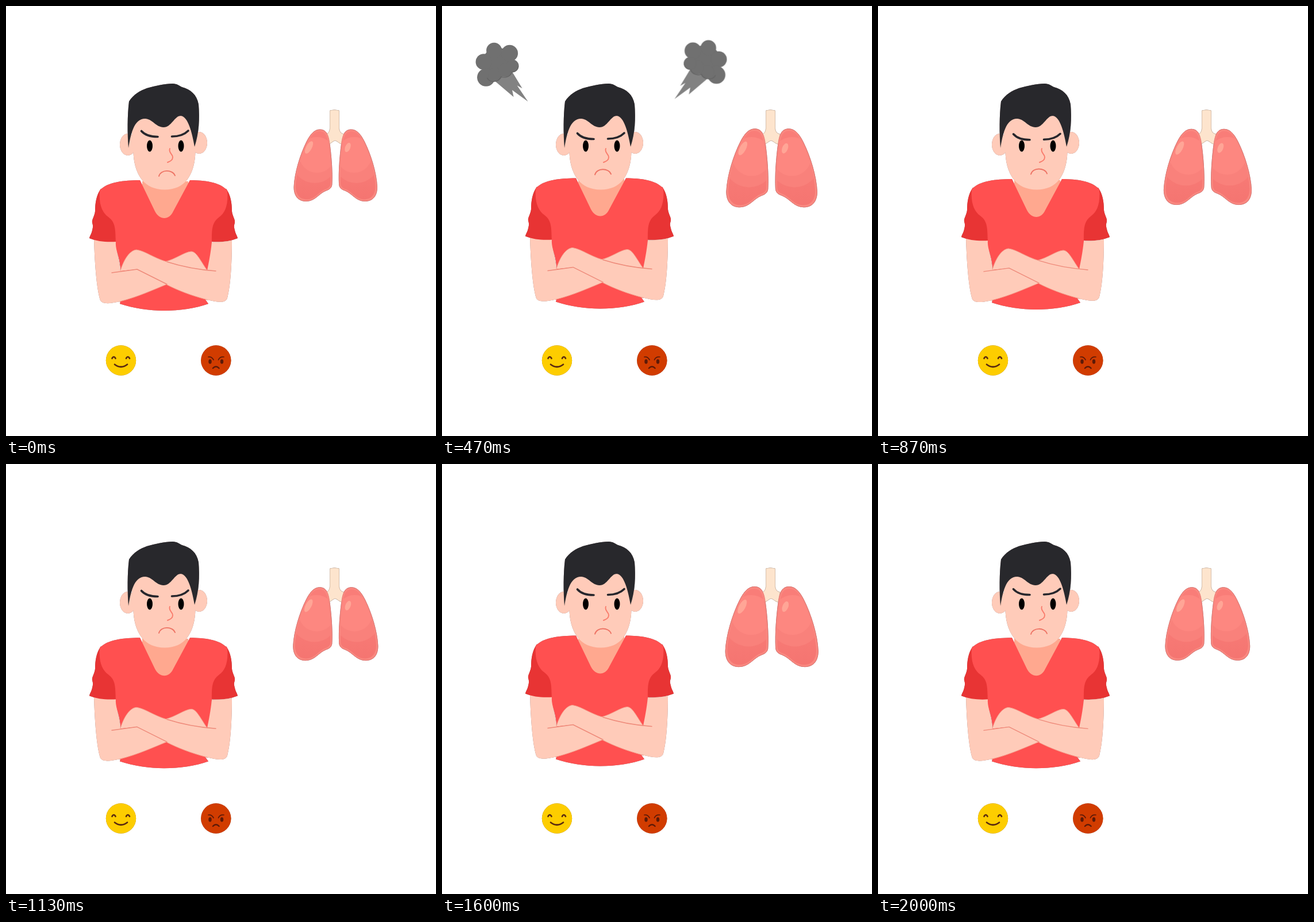
These frames come from a looping animation (748x748 px, 2.07 s). An HTML page without scripts:

```html
<!DOCTYPE html>
<html lang="en">
<head>
<meta charset="utf-8">
<title>Anger and breathing</title>
<style>
@property --breath { syntax: '<number>'; inherits: true; initial-value: 0; }
@property --puff { syntax: '<number>'; inherits: true; initial-value: 0; }
@property --brow { syntax: '<number>'; inherits: true; initial-value: 0; }

html, body { margin: 0; width: 100%; height: 100%; overflow: hidden; background: #fff; }
svg {
  display: block; width: 100vw; height: 100vh;
  animation: breath 2070ms -8ms infinite, puff 2070ms -8ms infinite, brow 2070ms -8ms infinite;
}

/* The picture advances in 31 equal ticks per loop. */
@keyframes breath {
  0% { --breath: 0; animation-timing-function: steps(4); }
  12.903% { --breath: .46; animation-timing-function: steps(5); }
  29.032% { --breath: 1; animation-timing-function: steps(4); }
  41.935% { --breath: .46; animation-timing-function: steps(3); }
  51.613% { --breath: .03; animation-timing-function: steps(5); }
  67.742% { --breath: .69; animation-timing-function: steps(3); }
  77.419% { --breath: 1; animation-timing-function: steps(3); }
  87.097% { --breath: .53; animation-timing-function: steps(3); }
  96.774% { --breath: .14; animation-timing-function: steps(1); }
  100% { --breath: 0; }
}
@keyframes puff {
  0%, 3.226% { --puff: -.6; animation-timing-function: steps(9); }
  32.258%, 100% { --puff: 1.2; }
}
@keyframes brow {
  0% { --brow: 0; animation-timing-function: steps(4); }
  12.903% { --brow: 2.4; animation-timing-function: steps(5); }
  29.032% { --brow: 5; animation-timing-function: steps(2); }
  35.484% { --brow: 5.8; animation-timing-function: steps(2); }
  41.935% { --brow: 5.3; animation-timing-function: steps(8); }
  67.742% { --brow: .7; animation-timing-function: steps(10); }
  100% { --brow: 0; }
}
@keyframes show {
  0% { visibility: hidden; }
  3.226% { visibility: visible; }
  35.484%, 100% { visibility: hidden; }
}
@keyframes blink {
  0% { transform: none; }
  9.677% { transform: scaleY(.67); }
  12.903% { transform: scaleY(.35); }
  16.129% { transform: scaleY(.67); }
  19.355%, 100% { transform: none; }
}

.edged { filter: drop-shadow(0 0 .5px #3008); }
.torso { transform: translateY(calc(var(--breath) * -4.5px)); }
.lung { transform: scale(calc(1 + var(--breath) * .118)); }
.lung.a { transform-origin: 567.5px 228px; }
.lung.b { transform-origin: 571px 228px; }
.brows { transform: translateY(calc(var(--brow) * 1px)); }
.mouth { transform: translateY(calc(var(--brow) * -.65px)); }
.eyes { transform-origin: 277px 243px; animation: blink 2070ms -8ms step-end infinite; }
.smoke { opacity: calc(.9 - var(--puff) * .074); animation: show 2070ms -8ms step-end infinite; }
.smoke .a { transform: translate(calc(var(--puff) * -14px), calc(var(--puff) * -13px)); }
.smoke .b { transform: translate(calc(var(--puff) * 7.5px), calc(var(--puff) * -7px)); }
.line { fill: none; stroke-linecap: round; stroke-linejoin: round; }
</style>
</head>
<body>
<svg viewBox="0 0 748 748">
  <defs>
    <linearGradient id="flesh" x2="0" y2="1">
      <stop offset=".4" stop-color="#f97d78"/>
      <stop offset="1" stop-color="#f47470"/>
    </linearGradient>
    <path id="lobe" d="M546 215C556 215 561 222 563 240C566 262 568 290 567 309C567 316 563 319 557 321C544 326 538 339.5 522 339.5C508 339.5 501 330 501 315C502 290 512 258 523 236C530 222 537 215 546 215Z"/>
    <clipPath id="inLobe"><use href="#lobe" transform="translate(537 277) scale(.92 .95) translate(-537 -277)"/></clipPath>
    <g id="lung">
      <use href="#lobe" fill="#f98880"/>
      <g clip-path="url(#inLobe)">
        <path fill="url(#flesh)" d="M495 210h80v135h-80z"/>
        <circle cx="537" cy="268" r="40" fill="#f9817b"/>
        <circle cx="541" cy="259" r="31" fill="#fd8780"/>
      </g>
      <use href="#lobe" fill="none" stroke="#e8736f" stroke-width=".8"/>
    </g>
    <g id="cloud">
      <path fill="#6d6d6d" d="M100 138L133 166L130.500 154L158 174L139 146L148 151L128 118Z"/>
      <g fill="#585858">
        <circle cx="105" cy="106" r="26"/>
        <circle cx="99" cy="85" r="13.5"/>
        <circle cx="126" cy="90" r="14.5"/>
        <circle cx="81" cy="105" r="14"/>
        <circle cx="85" cy="132" r="15.5"/>
        <circle cx="101" cy="127" r="12"/>
        <circle cx="119" cy="119" r="12"/>
        <circle cx="131" cy="112" r="11"/>
      </g>
      <path class="line" stroke="#484848" stroke-width="1.2" d="M87 133C91 141 106 142 111 131C119 134 128 130 130 123C137 122 141 118 141 113"/>
    </g>
    <path id="sleeve" fill="#e83434" d="M165 318C157 329 155 343 155 357C154 366 149 371 150 377C151 381 152 383 150 390C149 396 146 399 145 404C160 410 175 411 193 410L196 380L180 330Z"/>
  </defs>

  <g class="edged">
    <g class="torso">
      <path fill="#ffa88f" d="M237 305H317V372H237Z"/>
      <path fill="#ffcbb9" d="M153 405L193 407C190 425 197 436 199 460L228 452L285 480C255 494 230 506 198 514C180 518 168 519 164 512C157 490 154 440 153 405Z"/>
      <use href="#sleeve"/>
      <use href="#sleeve" transform="translate(548 0) scale(-1 1)"/>
      <path fill="#ff5050" d="M233 303C205 303 176 306 163 321C161 346 168 360 178 367C191 377 190 388 191 411C190 424 197 434 199 455L203 500L198 518C222 526 250 530 275 530C302 530 330 526 352 518L347 511L352 450C356 438 357 424 358 411C358 388 358 377 371 367C381 360 387 346 385 321C372 306 345 303 320 303L291 357C284 373 267 373 259 357Z"/>
      <!-- folded arms -->
      <path fill="#ffcbb9" stroke="#f59c8a" stroke-width="1" d="M276 445C296 440 310 428 322 427C331 427 337 441 350 460L300 470Z"/>
      <path fill="#ffcbb9" d="M164 490L184 464L228 458L285 482C255 494 230 506 198 514L170 515Z"/>
      <path fill="#ffcbb9" d="M199 461C205 441 215 425 227 424C242 426 256 438 280 445C302 452 328 457 350 460C353 445 356 430 358 411C370 411 382 410 393 408C393 445 391 485 385 508C382 517 370 516 350 511C320 503 300 495 280 485L228 458Z"/>
      <path class="line" stroke="#ee8a7a" stroke-width="1.4" d="M184 464L228 458L280 484M280 445C308 454 338 459 365 461"/>
      <path class="line" stroke="#f59c8a" stroke-width="1" d="M199 460C205 441 215 425 227 424C242 426 256 438 280 445M280 484C255 494 230 506 198 514M280 485C300 495 320 503 350 511"/>
    </g>

    <g fill="#ffcbb9">
      <ellipse cx="212" cy="241" rx="14" ry="19"/>
      <ellipse cx="336" cy="238" rx="14" ry="19"/>
      <path d="M217 195L222 262C225 293 240 319.5 276 319.5C312 319.5 326 293 329 262L333 190Z"/>
    </g>
    <path fill="#28282c" d="M213 247C211 222 211 190 214 166C221 154 234 147 245 143C260 139 276 135 290 135C297 135 302 139 306 141C321 145 332 154 335 171C337 196 336 221 328 245C324 222 317 192 304 191C293 191 288 211 274 211C261 211 254 196 242 196C222 196 217 224 213 247Z"/>
    <path class="brows line" stroke="#26262c" stroke-width="3.6" d="M235.500 217.500C242 225 252 227.500 264 227.500M288.500 227C300 227 310 224 317 217"/>
    <g class="eyes">
      <ellipse cx="250" cy="243.500" rx="5" ry="10"/>
      <ellipse cx="304.500" cy="243.500" rx="5" ry="10"/>
    </g>
    <path class="line" stroke="#f97c6c" stroke-width="1.900" d="M285 248C282 255 290 257 290 263C290 268 286 270 281 272"/>
    <path class="mouth line" stroke="#ee7465" stroke-width="1.900" d="M266 296C269 284 290 284 294 295"/>

    <path fill="#fde4cd" stroke="#dcc3ac" stroke-width=".7" d="M563.500 182Q571 179.500 579.500 182V213C580 219 583 222 588 223L585 240C580 240 577 235 572.500 234C568 235 565 240 560 240L557 223C561 222 563 218 563.500 213Z"/>
    <g class="lung a">
      <use href="#lung"/>
      <ellipse cx="527" cy="246" rx="5" ry="12" fill="#ffa596" transform="rotate(28 527 246)"/>
    </g>
    <g class="lung b">
      <use href="#lung" transform="translate(1146.500 0) scale(-1 1)"/>
      <ellipse cx="594.500" cy="246" rx="4.500" ry="8.500" fill="#ffa596" transform="rotate(22 594.500 246)"/>
    </g>

    <circle cx="200" cy="616.500" r="26.200" fill="#fdcd00"/>
    <path class="line" stroke="#5b2b10" stroke-width="2.700" d="M184.500 613Q187.500 607.500 190.500 613M209 613Q212 607.500 215 613M189 623.500Q200 632 211 623.500"/>
    <circle cx="365.300" cy="616.500" r="26.200" fill="#d13c00"/>
    <g fill="#5c1a08">
      <ellipse cx="355" cy="618.500" rx="2.700" ry="4"/>
      <ellipse cx="375.500" cy="618.500" rx="2.700" ry="4"/>
    </g>
    <path class="line" stroke="#5c1a08" stroke-width="1.700" d="M352 610.500Q358 609.500 361 615.500M379 610.500Q372 609.500 369.500 615.500"/>
    <path class="line" stroke="#5c1a08" stroke-width="2.500" d="M360 630Q365.300 624.500 370.500 630"/>
  </g>

  <g class="smoke">
    <g class="a"><use href="#cloud"/></g>
    <g class="b"><use href="#cloud" transform="translate(558 -8) scale(-1 1)"/></g>
  </g>
</svg>
</body>
</html>
```
